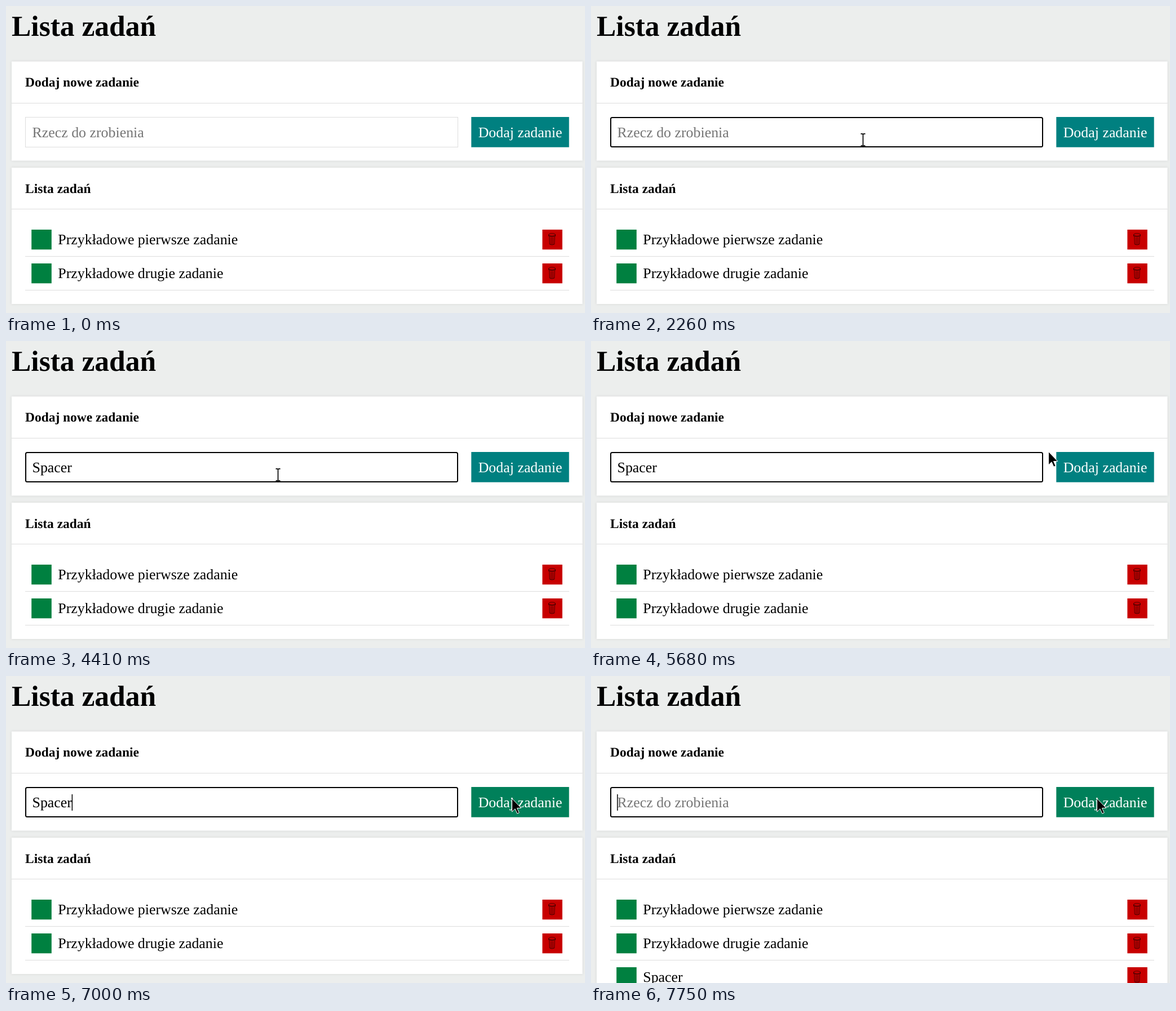
An HTML page for the animation above (8 s loop, 1027 px wide and 545 px high).

```html
<!DOCTYPE html>
<html lang="pl">
<head>
<meta charset="utf-8">
<title>Lista zadań</title>
<style>
  html, body { margin: 0; width: 100%; height: 100%; overflow: hidden; background: #eceeed; }
  svg { display: block; width: 1027px; height: 545px; }
  text { font: 25.88px "Liberation Serif", "Times New Roman", serif; text-rendering: geometricPrecision; white-space: pre; }
  .h1 { font-size: 51.5px; font-weight: bold; }
  .h3 { font-size: 23.45px; font-weight: bold; }
  .panel { fill: #fff; filter: drop-shadow(0 0 2px #d4d6d5); }
  .rule { fill: #ddd; }
  .bin { fill: none; stroke: #380000; stroke-width: .9; }
</style>
</head>
<body>
<svg viewBox="0 0 1027 545">
  <defs>
    <g id="bin" class="bin">
      <ellipse cx="17.5" cy="9" rx="6" ry="2.2"/>
      <path d="M11.5 9V11.5Q17.5 14 23.5 11.5V9M12.8 12.5L13.3 26Q17.5 28 21.7 26L22.2 12.5M16 14V26.5M19 14V26.5"/>
    </g>
  </defs>

  <text class="h1" x="10" y="52.5">Lista zadań</text>

  <rect class="panel" x="10" y="98.5" width="1012.5" height="176"/>
  <text class="h3" x="34" y="143">Dodaj nowe zadanie</text>
  <rect class="rule" x="10" y="172" width="1012.5" height="1"/>
  <rect id="field" fill="#fff"/>
  <text id="value" x="46.5" y="233"></text>
  <rect id="caret" y="210" width="1.5" height="29"/>
  <rect id="button" x="825.3" y="197" width="173.4" height="53.7"/>
  <text x="837.7" y="233" fill="#fff">Dodaj zadanie</text>

  <rect id="list" class="panel" x="10" y="287" width="1012.5"/>
  <text class="h3" x="34" y="331.5">Lista zadań</text>
  <rect class="rule" x="10" y="360" width="1012.5" height="1"/>
  <g id="rows"></g>

  <path id="beam" fill="none" stroke="#000" stroke-width="1.7"
        d="M-4 -10.7H-1.5L0 -9.7L1.5 -10.7H4M0 -9.7V9.7M-4 10.7H-1.5L0 9.7L1.5 10.7H4"/>
  <path id="arrow" stroke="#fff" stroke-width="1" stroke-linejoin="round"
        d="M.5 .5V24L6 18.8L9.8 27.3L13.2 25.8L9.5 17.5H16.8Z"/>
</svg>
<script>
const $ = id => document.getElementById(id);
const set = (el, attrs) => { for (const k in attrs) el.setAttribute(k, attrs[k]); };

const LOOP = 8000;
const STEP = 68;        // pointer refresh
const BLINK = 530;      // caret half period
const WORD = "Spacer";
const FOCUS = 1660, PRESS = 7617, ADDED = 7683;
const KEYS = [2660, 2870, 3070, 3280, 3600, 3800];
const CARET_STARTS = [FOCUS + 70, ...KEYS, ADDED];

// pointer key points, the last leg of each move eases out
const MOVES = [
  [{ t: 500, x: 886, y: 485 }, { t: 770, x: 551, y: 287 },
   { t: 908, x: 508, y: 248 }, { t: 1180, x: 482.5, y: 237.5 }],
  [{ t: 5062, x: 482.5, y: 237.5 }, { t: 5606, x: 783, y: 190 },
   { t: 5674, x: 811, y: 196 }, { t: 6280, x: 897, y: 217 }]
];

const rows = ["Przykładowe pierwsze zadanie", "Przykładowe drugie zadanie", WORD].map((label, i) => {
  const row = document.createElementNS("http://www.w3.org/2000/svg", "g");
  row.setAttribute("transform", `translate(0 ${397 + i * 60})`);
  row.innerHTML = `
    <rect x="45.2" width="35.6" height="35.3" fill="#008040"/>
    <text x="92.3" y="26">${label}</text>
    <rect x="951.4" width="35.4" height="35.3" fill="#c80000"/>
    <use href="#bin" x="951"/>
    <rect class="rule" x="34" y="47" width="965" height="1"/>`;
  $("rows").append(row);
  return row;
});

const passed = (times, t) => times.filter(at => t >= at).length;
const inside = (p, left, right) => p && p.x > left && p.x < right && p.y > 197 && p.y < 251;

function pointerAt(time) {
  const move = MOVES.filter(m => time >= m[0].t).pop();
  if (!move) return null;
  const t = move[0].t + Math.floor((time - move[0].t) / STEP) * STEP;
  const end = Math.max(1, move.findIndex(p => p.t > t));
  const i = t >= move.at(-1).t ? move.length - 1 : end;
  const [a, b] = [move[i - 1], move[i]];
  let k = Math.min(1, (t - a.t) / (b.t - a.t));
  if (i === move.length - 1) k *= 2 - k;
  return { x: a.x + (b.x - a.x) * k, y: a.y + (b.y - a.y) * k };
}

function caretOn(t) {
  const began = CARET_STARTS.filter(at => t >= at).pop();
  return began !== undefined && Math.floor((t - began) / BLINK) % 2 === 0;
}

function drawField(t) {
  const focused = t >= FOCUS && !(t >= PRESS && t < ADDED);
  set($("field"), focused
    ? { x: 35, y: 198, width: 766, height: 52, rx: 2.5, stroke: "#000", "stroke-width": 2 }
    : { x: 34.5, y: 197.5, width: 767, height: 53, rx: 0, stroke: "#ddd", "stroke-width": 1 });

  const typed = t < ADDED ? WORD.slice(0, passed(KEYS, t)) : "";
  const value = $("value");
  value.textContent = typed || "Rzecz do zrobienia";
  set(value, { fill: typed ? "#000" : "#757575" });
  set($("caret"), {
    x: 46.2 + (typed ? value.getComputedTextLength() : 0),
    visibility: caretOn(t) ? "visible" : "hidden"
  });
}

function drawPointer(pos) {
  const inField = inside(pos, 34, 802);
  const place = (el, shown) => set(el, {
    visibility: shown ? "visible" : "hidden",
    transform: pos ? `translate(${pos.x} ${pos.y})` : ""
  });
  place($("beam"), inField);
  place($("arrow"), pos && !inField);
}

function draw(t) {
  const added = t >= ADDED;
  const pos = pointerAt(t);
  drawField(t);
  drawPointer(pos);
  set($("button"), { fill: inside(pos, 825, 999) ? "#00805a" : "#008080" });
  set($("list"), { height: added ? 302 : 242 });
  set(rows[2], { visibility: added ? "visible" : "hidden" });
}

const start = performance.now();
function tick() {
  draw((performance.now() - start) % LOOP);
  requestAnimationFrame(tick);
}
tick();
</script>
</body>
</html>
```
